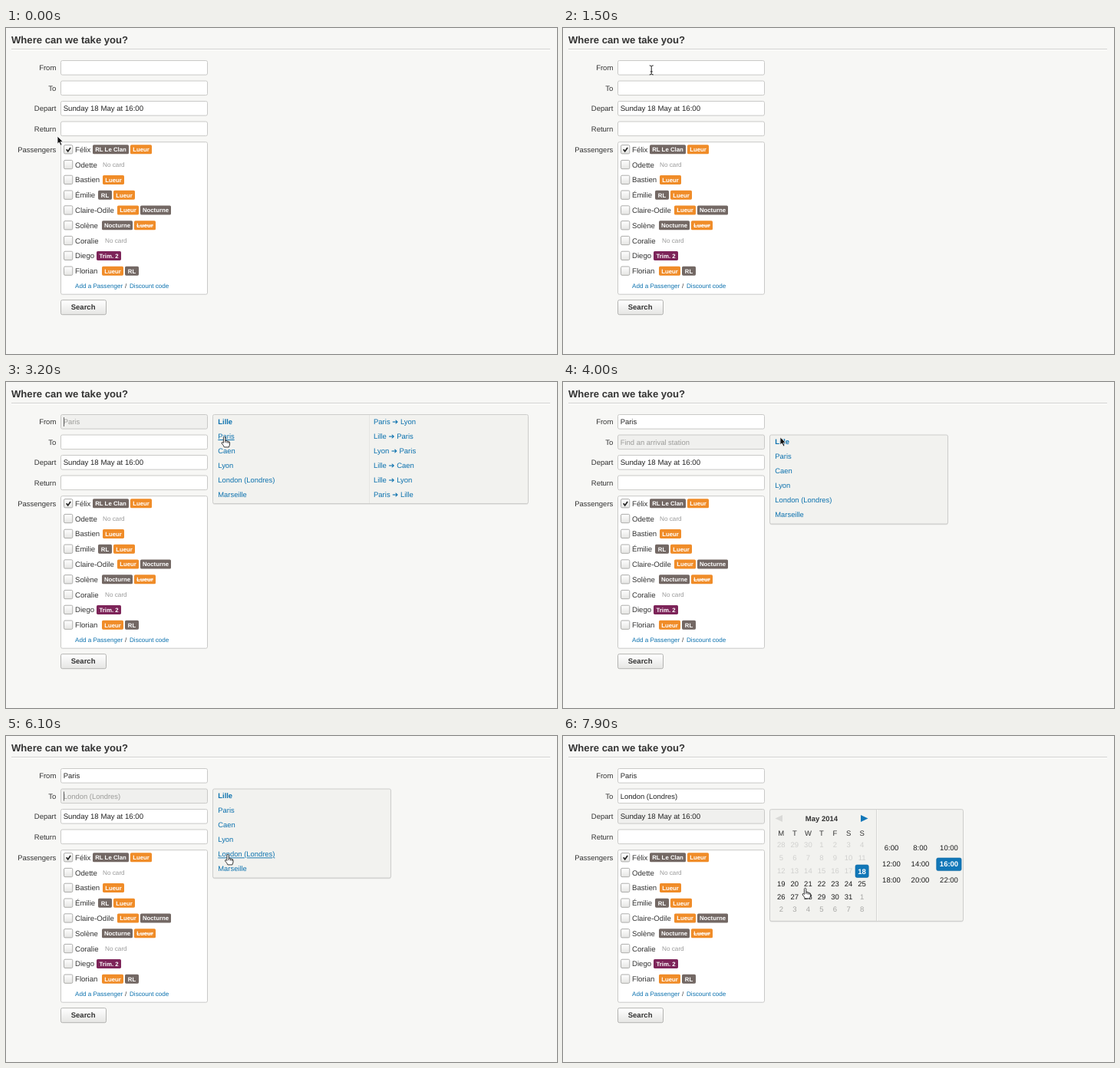
Write an HTML page that moves like this. It is 718 by 425 pixels and loops after 8 s.

```html
<!DOCTYPE html>
<html lang="en">
<head>
<meta charset="utf-8">
<title>Trip search</title>
<style>
  html, body { margin: 0; width: 100%; height: 100%; overflow: hidden; background: #f7f7f5; }
  svg { display: block; width: 718px; height: 425px; }
  text { font-family: "Liberation Sans", Arial, sans-serif; font-size: 9.5px; fill: #333; text-rendering: geometricPrecision; white-space: pre; }
  .b { font-weight: bold; }
  .link { fill: #0b71ae; }
  .hot { text-decoration: underline; }
  .off { display: none; }
</style>
</head>
<body>
<svg id="stage" viewBox="0 0 718 425" xmlns="http://www.w3.org/2000/svg"></svg>
<script>
const LOOP = 8000;
const CLICK_FROM = 1550, CLICK_TO = 3950, CLICK_DATE = 6800;
const BLUE = '#1177b8', GREY = '#736864', ORANGE = '#f08c28', PLUM = '#7d2459';
const CITIES = ['Lille', 'Paris', 'Caen', 'Lyon', 'London (Londres)', 'Marseille'];
const TRIPS = ['Paris Lyon', 'Lille Paris', 'Lyon Paris', 'Lille Caen', 'Lille Lyon', 'Paris Lille'];
const INPUT_Y = [42.5, 69, 95.5, 122];

// name, then tags as [x, width, colour, label, struck]
const PEOPLE = [
  ['Félix', [113, 47, GREY, 'RL Le Clan'], [162, 28, ORANGE, 'Lueur']],
  ['Odette', 126],
  ['Bastien', [126, 28, ORANGE, 'Lueur']],
  ['Émilie', [120, 18, GREY, 'RL'], [140, 28, ORANGE, 'Lueur']],
  ['Claire-Odile', [145, 28, ORANGE, 'Lueur'], [175, 40, GREY, 'Nocturne']],
  ['Solène', [125, 40, GREY, 'Nocturne'], [167, 28, ORANGE, 'Lueur', true]],
  ['Coralie', 129],
  ['Diego', [118, 32, PLUM, 'Trim. 2']],
  ['Florian', [125, 28, ORANGE, 'Lueur'], [155, 18, GREY, 'RL']]
];

// pointer keys: time, x, y
const PATH = [
  [0, 67, 141], [100, 67, 141], [950, 87, 50.5], [1050, 87, 50.5],
  [1550, 116, 55], [2050, 116, 55], [2300, 124, 56], [2800, 283, 71.5],
  [4900, 283, 72], [5750, 287.5, 154.5], [6900, 287.5, 154.5], [7850, 314, 198.5], [LOOP, 314, 198.5]
];

const text = (x, y, s, attrs = '') => `<text x="${x}" y="${y}" ${attrs}>${s}</text>`;
const rect = (x, y, w, h, fill, attrs = '') =>
  `<rect x="${x}" y="${y}" width="${w}" height="${h}" fill="${fill}" ${attrs}/>`;
const mid = 'text-anchor="middle"';

function tag([x, w, color, label, struck], cy) {
  return rect(x, cy - 6, w, 12, color, 'rx="1.6"') +
    text(x + w / 2, cy + 2.8, label, `${mid} class="b" style="font-size:7.8px;fill:#fff${struck ? ';text-decoration:line-through' : ''}"`);
}

function person([name, ...cards], i) {
  const cy = 158.3 + i * 19.8;
  let s = rect(75.5, cy - 5.7, 11.3, 11.3, 'url(#btn)', 'rx="1.5" stroke="#adadab"') +
    text(90, cy + 3.5, name, 'style="font-size:9.65px"');
  if (!i) s += `<path d="M78.7 ${cy}l2 2.6 3.4-5" fill="none" stroke="#222" stroke-width="1.7"/>`;
  return s + cards.map(c => Array.isArray(c) ? tag(c, cy)
    : text(c, cy + 3.3, 'No card', 'style="font-size:8.2px;fill:#999"')).join('');
}

function form() {
  let s = text(7, 20.3, 'Where can we take you?', 'class="b" style="font-size:13.1px"') +
    rect(7, 27, 702, 1, '#d2d2d0') + rect(7, 28, 702, 1, '#fff');
  ['From', 'To', 'Depart', 'Return', 'Passengers'].forEach((l, i) =>
    s += text(65.3, 55 + 26.6 * i + (i > 3 ? 0.8 : 0), l, 'text-anchor="end"'));
  INPUT_Y.forEach((y, i) => {
    s += rect(71.5, y, 191, 18.6, '#fff', `id="box${i}" rx="2" stroke="#c9c9c7"`) +
      text(74.7, y + 12.7, '', `id="val${i}"`);
  });
  s += rect(75, 46, 0.9, 12, '#555', 'id="caret"');
  s += rect(71.5, 148.7, 191, 198.5, '#fff', 'rx="2" stroke="#c9c9c7"') + PEOPLE.map(person).join('');
  const small = 'style="font-size:8.1px" class="link"';
  s += text(90, 339.4, 'Add a Passenger', small) + text(155, 339.4, '/', 'style="font-size:8.1px"') +
    text(161, 339.4, 'Discount code', small);
  s += rect(71.5, 354.7, 59, 19, 'url(#btn)', 'rx="2" stroke="#b3b3b1"') +
    text(100.6, 367.3, 'Search', `${mid} class="b"`);
  return s;
}

const panel = (y, w, h) => rect(269.5, y + 1.2, w, h, '#000', 'rx="2" opacity=".1"') +
  rect(269.5, y, w, h, '#f2f2ef', 'rx="2" stroke="#cdcdcb"');

const cities = (id, y) => CITIES.map((c, i) =>
  text(276.3, y + 19 * i, c, `id="${id}${i}" class="link${i ? '' : ' b'}" style="font-size:9.4px"`)).join('');

function fromPanel() {
  return panel(42.5, 411, 116) + rect(473, 43, 1, 115, '#e6e6e3') + cities('a', 55) +
    TRIPS.map((p, i) => text(479, 55 + 19 * i, p.replace(' ',
      ' <tspan style="font-family:\'DejaVu Sans\',sans-serif">➔</tspan> '), 'class="link"')).join('');
}

const toPanel = () => panel(69, 232, 116) + cities('b', 81.4);

function calendar() {
  let s = panel(95.7, 252, 145.6) + rect(408, 96, 1, 145, '#d6d6d4') + rect(409, 96, 1, 145, '#fafaf8') +
    '<path d="M286 103v9l-9.5-4.5z" fill="#d9d9d7"/>' +
    `<path d="M388 103v9l9.5-4.5z" fill="${BLUE}"/>` +
    text(337, 110.7, 'May 2014', `${mid} class="b"`);
  [...'MTWTFSS'].forEach((d, i) => s += text(284.3 + 17.55 * i, 130.4, d, mid));
  for (let i = 0; i < 42; i++) {
    const x = 284.3 + 17.55 * (i % 7), y = 145.4 + 16.8 * Math.floor(i / 7);
    const day = new Date(2014, 3, 28 + i).getDate(), now = i === 20;
    if (now) s += rect(381, 168, 17.2, 16.4, BLUE, 'rx="2" stroke="#0d659e" stroke-width=".6"');
    const fill = now ? '#fff' : i < 20 ? '#d0d0ce' : i < 34 ? '#1c1c1c' : '#a6a6a4';
    s += text(x, y + (now ? 0.8 : 0), day, `${mid} ${now ? 'class="b"' : ''} style="fill:${fill}"`);
  }
  for (let i = 0; i < 9; i++) {
    const x = 428 + 37.5 * (i % 3), y = 149 + 21.2 * Math.floor(i / 3), on = i === 5;
    if (on) s += rect(486.7, 159, 32.4, 16.6, BLUE, 'rx="2" stroke="#0d659e" stroke-width=".6"');
    s += text(x, y, `${6 + 2 * i}:00`, `${mid} ${on ? 'class="b"' : ''} style="fill:${on ? '#fff' : '#1c1c1c'}"`);
  }
  return s;
}

const POINTERS = `
  <path id="arrow" d="M0 0v10.2l2.3-2.1 1.8 4.1 1.9-.8-1.8-4h3.2z" fill="#111" stroke="#fff" stroke-width=".8"/>
  <path id="beam" d="M-2.5-6Q0-6 0-4.5Q0-6 2.5-6M0-4.5v9M-2.5 6Q0 6 0 4.5Q0 6 2.5 6M-1.5 2h3" fill="none" stroke="#222"/>
  <path id="hand" d="M.4 8V1Q.6-.2 1.6-.2T2.8 1V5Q4.6 4.2 5 5.6Q6.6 5 7 6.3Q8.6 6 8.6 7.8Q8.8 10.4 7.4 13.4H1.4Q.4 10.8-1.8 8.6Q-2.2 6.8-.6 7Z
    M2.8 5V7.5M5 5.6V8M7 6.3V8.4" fill="#fff" stroke="#222" stroke-width=".9" stroke-linejoin="round"/>`;

const stage = document.getElementById('stage');
stage.innerHTML = `<defs><linearGradient id="btn" x2="0" y2="1"><stop stop-color="#fff"/><stop offset="1" stop-color="#e5e5e3"/></linearGradient></defs>
  ${form()}<g id="from">${fromPanel()}</g><g id="to">${toPanel()}</g><g id="cal">${calendar()}</g><g id="pointer">${POINTERS}</g>`;

const $ = id => document.getElementById(id);
const show = (id, on) => $(id).classList.toggle('off', !on);

function pointerAt(t) {
  const i = Math.max(1, PATH.findIndex(k => t < k[0]));
  const [t0, x0, y0] = PATH[i - 1], [t1, x1, y1] = PATH[i];
  const u = (t - t0) / (t1 - t0), e = u * u * (3 - 2 * u);
  return [x0 + (x1 - x0) * e, y0 + (y1 - y0) * e];
}

function rowAt(x, y, top) {
  const i = Math.round((y - top) / 19);
  return x > 275 && x < 350 && CITIES[i] && Math.abs(y - top - 19 * i) < 8.5 ? i : -1;
}

function setInput(i, value, focused, hint) {
  $('box' + i).setAttribute('fill', focused ? '#f0f0ee' : '#fff');
  const el = $('val' + i);
  el.textContent = value || (focused ? hint : '');
  el.style.fill = value ? '#222' : '#9b9b99';
  el.style.fontSize = value && i > 1 ? '9.65px' : '9.45px';
}

function draw(t) {
  const [x, y] = pointerAt(t);
  const focus = t < CLICK_FROM ? -1 : t < CLICK_TO ? 0 : t < CLICK_DATE ? 1 : 2;
  let row = -1;
  if (focus === 0) row = rowAt(x, y, 51.5);
  if (focus === 1 && t > 4950) row = rowAt(x, y, 78);

  setInput(0, focus > 0 ? 'Paris' : '', focus === 0, CITIES[row] || 'Find a departure station');
  setInput(1, focus > 1 ? 'London (Londres)' : '', focus === 1, CITIES[row] || 'Find an arrival station');
  setInput(2, 'Sunday 18 May at 16:00', focus === 2);

  ['from', 'to', 'cal'].forEach((id, i) => show(id, focus === i));
  CITIES.forEach((c, i) => {
    $('a' + i).classList.toggle('hot', focus === 0 && row === i);
    $('b' + i).classList.toggle('hot', focus === 1 && row === i);
  });

  const lit = (t + 950) % 1000 < 500;
  show('caret', lit && (focus === 0 || focus === 1));
  $('caret').setAttribute('y', focus === 1 ? 72.5 : 46);

  const overInput = x > 71 && x < 263 && INPUT_Y.some(v => y > v && y < v + 19);
  const kind = row >= 0 || (focus === 2 && y > 184) ? 'hand' : overInput ? 'beam' : 'arrow';
  ['arrow', 'beam', 'hand'].forEach(id => show(id, id === kind));
  $('beam').setAttribute('stroke', t < 1100 ? '#aaa' : '#222');
  $('pointer').setAttribute('transform', `translate(${x} ${y})`);
}

function tick(now) {
  draw(now % LOOP);
  requestAnimationFrame(tick);
}
draw(0);
requestAnimationFrame(tick);
</script>
</body>
</html>
```
